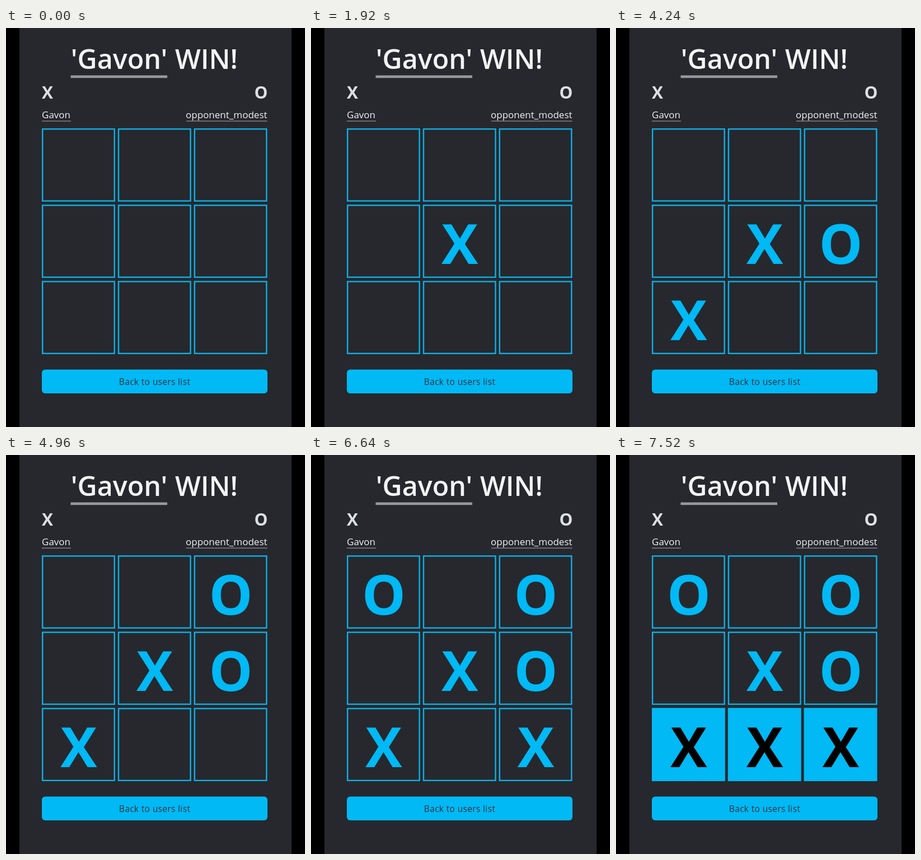
Animation of 534x712 px, one loop 7.6 s. Source, as an HTML page:

```html
<!DOCTYPE html>
<html lang="en">
<head>
<meta charset="utf-8">
<style>
  html, body { margin: 0; height: 100%; overflow: hidden; background: #000; }
  svg { display: block; font-family: "Open Sans", "Noto Sans", sans-serif; fill: #f2f3f4; }
  .title { font-size: 48.4px; font-weight: 600; }
  .side { font-size: 30px; font-weight: 700; fill: #dde1e4; }
  .name { font-size: 17px; }
  .button { font-size: 15.5px; letter-spacing: .35px; fill: #25303a; }
  .end { text-anchor: end; }
  .mid { text-anchor: middle; }
  .line { fill: #97989b; }
  .cell rect { fill: none; stroke: #0cb0e8; stroke-width: 2.4; }
  .cell text { font-size: 98px; font-weight: 700; fill: #00b9f5; }
  .win rect { fill: #00b9f5; stroke: #00b9f5; }
  .win text { fill: #000; }
</style>
</head>
<body>
<svg width="534" height="712" viewBox="0 0 534 712">
  <rect x="24" width="486" height="712" fill="#27282d"/>
  <text class="title mid" x="202" y="72.7">'Gavon'</text>
  <text class="title" x="302" y="72.7">WIN!</text>
  <rect class="line" x="115.5" y="84.5" width="172.5" height="4.7"/>
  <text class="side" x="64" y="126">X</text>
  <text class="side end" x="467.5" y="126">O</text>
  <text class="name" x="64" y="161">Gavon</text>
  <text class="name end" x="466.5" y="161">opponent_modest</text>
  <rect class="line" x="64" y="165.5" width="52" height="1.2"/>
  <rect class="line" x="322" y="165.5" width="144.5" height="1.2"/>
  <g id="board"></g>
  <rect x="64" y="609.5" width="403" height="42.5" rx="6" fill="#00b9f5"/>
  <text class="button mid" x="265.5" y="637">Back to users list</text>
</svg>
<script>
const LOOP = 7600, STEP = 80;               // the picture advances in 80 ms steps
const FIRST_MOVE = 1320, MOVE_GAP = 1000;
const moves = [4, 5, 6, 2, 8, 0, 7];        // cell indices, X starts
const winLine = [6, 7, 8];

const board = document.getElementById("board");
for (let i = 0; i < 9; i++) {
  const x = 65.2 + (i % 3) * 135.8, y = 180.3 + Math.floor(i / 3) * 136.1;
  board.innerHTML += `<g class="cell"><rect x="${x}" y="${y}" width="128.5" height="128.3"/>` +
    `<text class="mid" x="${x + 64.7}" y="${y + 104.5}"></text></g>`;
}
const cells = [...board.children];

function draw(now) {
  const time = Math.floor((now % LOOP) / STEP) * STEP;
  const played = Math.max(0, Math.floor((time - FIRST_MOVE) / MOVE_GAP) + 1);
  cells.forEach((cell, i) => {
    const turn = moves.indexOf(i);
    const shown = turn >= 0 && turn < played;
    cell.lastChild.textContent = shown ? "XO"[turn % 2] : "";
    cell.classList.toggle("win", played >= moves.length && winLine.includes(i));
  });
}

const start = performance.now();
function tick() {
  draw(performance.now() - start);
  requestAnimationFrame(tick);
}
tick();
</script>
</body>
</html>
```
